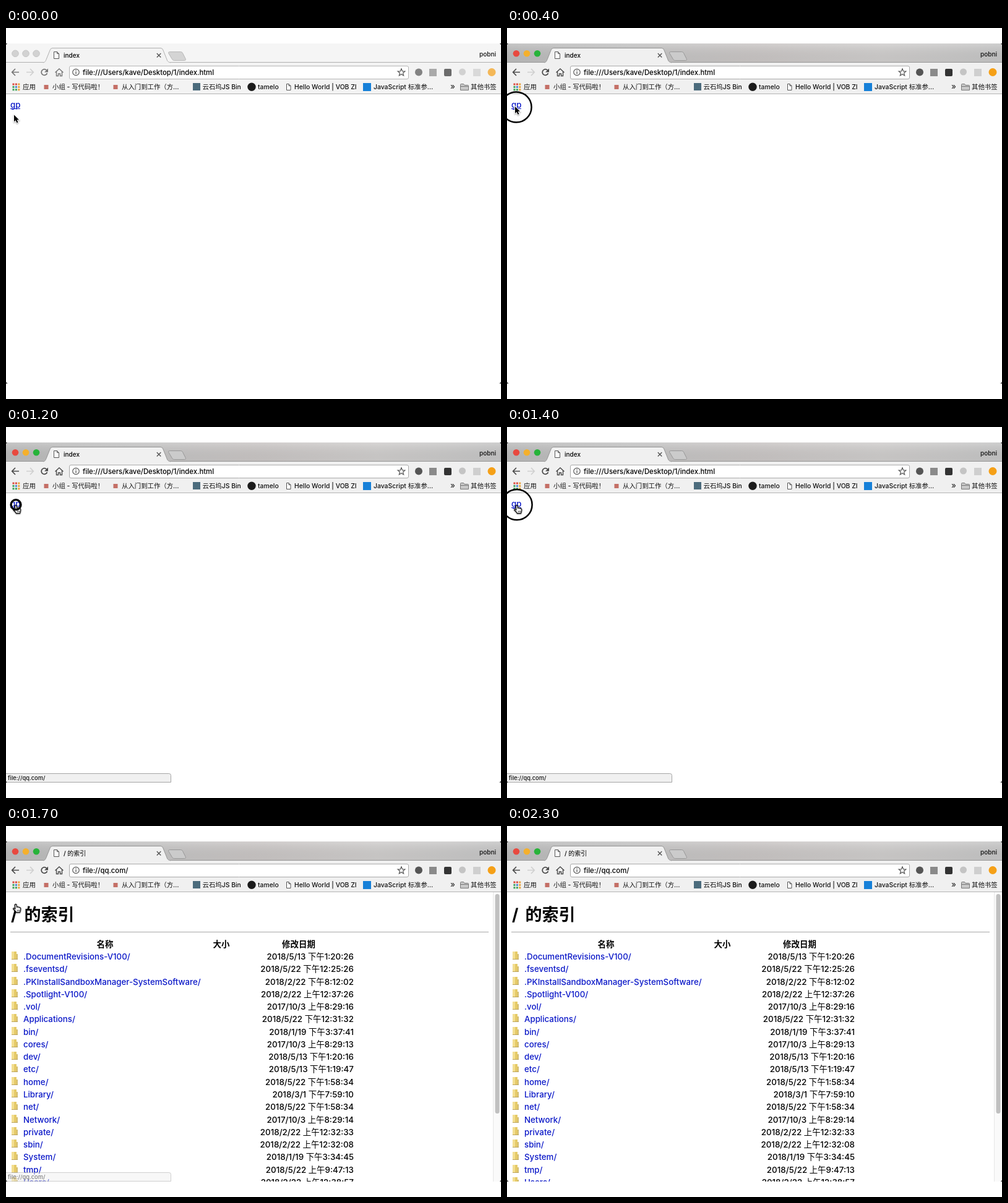
An HTML page with a canvas that plays this animation: 800 px wide and 600 px high, repeating every 2400 ms.

```html
<!DOCTYPE html>
<html lang="zh-CN">
<head>
<meta charset="utf-8">
<title>Browser link demo</title>
<style>
  html, body { margin: 0; width: 100%; height: 100%; overflow: hidden; background: #fff; }
  canvas { display: block; }
</style>
</head>
<body>
<canvas id="stage" width="800" height="600"></canvas>
<script>
const ctx = document.getElementById('stage').getContext('2d');
const LOOP = 2400, STEP = 100;
const FACE = 'Inter, "Noto Sans CJK SC", "Noto Sans CJK", sans-serif';
const LINK = '#0b18c8';

const FILES = [
  ['.DocumentRevisions-V100/', '2018/5/13 下午1:20:26'],
  ['.fseventsd/', '2018/5/22 下午12:25:26'],
  ['.PKInstallSandboxManager-SystemSoftware/', '2018/2/22 下午8:12:02'],
  ['.Spotlight-V100/', '2018/2/22 上午12:37:26'],
  ['.vol/', '2017/10/3 上午8:29:16'],
  ['Applications/', '2018/5/22 下午12:31:32'],
  ['bin/', '2018/1/19 下午3:37:41'],
  ['cores/', '2017/10/3 上午8:29:13'],
  ['dev/', '2018/5/13 下午1:20:16'],
  ['etc/', '2018/5/13 下午1:19:47'],
  ['home/', '2018/5/22 下午1:58:34'],
  ['Library/', '2018/3/1 下午7:59:10'],
  ['net/', '2018/5/22 下午1:58:34'],
  ['Network/', '2017/10/3 上午8:29:14'],
  ['private/', '2018/2/22 上午12:32:33'],
  ['sbin/', '2018/2/22 上午12:32:08'],
  ['System/', '2018/1/19 下午3:34:45'],
  ['tmp/', '2018/5/22 上午9:47:13'],
  ['Users/', '2018/2/22 上午12:38:57']
];

function text(str, x, y, size, color = '#000', align = 'left', weight = 500) {
  ctx.font = `${weight} ${size}px ${FACE}`;
  ctx.textAlign = align;
  ctx.fillStyle = color;
  ctx.fillText(str, x, y);
}

function rect(x, y, w, h, color) {
  ctx.fillStyle = color;
  ctx.fillRect(x, y, w, h);
}

function paint(fill, stroke, width = 1) {
  if (fill) { ctx.fillStyle = fill; ctx.fill(); }
  if (stroke) { ctx.strokeStyle = stroke; ctx.lineWidth = width; ctx.stroke(); }
}

function box(x, y, w, h, r, fill, stroke) {
  ctx.beginPath();
  ctx.roundRect(x, y, w, h, r);
  paint(fill, stroke);
}

function circle(x, y, r, fill, stroke, width) {
  ctx.beginPath();
  ctx.arc(x, y, r, 0, Math.PI * 2);
  paint(fill, stroke, width);
}

function shape(d, x, y, fill, stroke, width) {
  ctx.save();
  ctx.translate(x, y);
  const path = new Path2D(d);
  if (fill) { ctx.fillStyle = fill; ctx.fill(path); }
  if (stroke) {
    ctx.strokeStyle = stroke;
    ctx.lineWidth = width || 1;
    ctx.stroke(path);
  }
  ctx.restore();
}

function gradient(x, y, colors) {
  const g = ctx.createLinearGradient(0, 25, x, y);
  colors.forEach((c, i) => g.addColorStop(i / (colors.length - 1), c));
  return g;
}

function page(x, y, w, h) {
  shape(`M0 0H${w - 3}L${w} 3V${h}H0ZM${w - 3} 0V3H${w}`, x, y, '#fff', '#555');
}

function titleBar(active, title) {
  if (active) {
    rect(0, 25, 800, 31, gradient(800, 25, ['#bcbcbc', '#c4c4c4', '#cac6c5', '#d0cecd', '#c6c6c6']));
    rect(0, 25, 800, 31, gradient(0, 56, ['rgba(255,255,255,.16)', 'rgba(0,0,0,.04)']));
  } else {
    rect(0, 25, 800, 31, '#f5f5f5');
  }
  const line = active ? '#959595' : '#b0b0b0';
  const bar = active ? '#f0f0f0' : '#f3f3f3';
  rect(0, 55, 800, 1, line);
  rect(0, 56, 800, 50, bar);
  rect(0, 106, 800, 1, '#b3b3b3');

  const lights = active ? ['#e8493f', '#f5b02c', '#27b33a'] : ['#d2d2d2', '#d2d2d2', '#d2d2d2'];
  lights.forEach((c, i) => circle(15 + 17 * i, 41.3, 5.3, c, active ? null : '#c6c6c6'));

  shape('M60 56C64 55 64 53 65 51L71 36Q72 32.5 75 32.5H250Q253 32.5 254 36L260 51C261 54 262 55 266 56', 0, 0, bar, line);
  rect(61, 56, 204, 1, bar);
  shape('M2 0H20Q22 0 23 2L28 12Q28 14 26 14H9Q7 14 6 12L0 2Q0 0 2 0Z', 262.5, 38.5, active ? '#cbcbcb' : '#d4d4d4', active ? '#999' : '#b8b8b8');
  page(77.5, 38.5, 8, 11);
  text(title, 93, 48, 10);
  shape('M0 0L6.5 6.5M6.5 0L0 6.5', 243.8, 41, null, '#555', 1.4);
  text('pobni', 792, 45.5, 10, '#111', 'right');
}

function toolBar(active, url) {
  const ink = active ? '#4a4a4a' : '#777';
  shape('M12 5.5H1M6 0L.7 5.5L6 11', 9, 66, null, ink, 1.7);
  shape('M0 5.5H11M6 0L11.3 5.5L6 11', 33, 66, null, '#d0d0d0', 1.7);
  ctx.beginPath();
  ctx.arc(62, 71.5, 4.8, 0.35, Math.PI * 1.77);
  paint(null, ink, 1.7);
  shape('M6 0V6H0Z', 62, 65.5, ink);
  shape('M0 6.5L6.5 .5L13 6.5M2 5V12H5V8.5H8V12H11V5', 79.5, 65.5, null, ink, 1.4);

  box(102.5, 61.5, 548, 21, 2.5, '#fff', active ? '#a9a9a9' : '#b5b5b5');
  circle(113, 71.5, 5.2, null, '#555', 1.2);
  rect(112.4, 70.5, 1.3, 4, '#555');
  rect(112.4, 68, 1.3, 1.4, '#555');
  text(url, 124, 76, 11.3);

  ctx.beginPath();
  for (let i = 0; i < 10; i++) {
    const r = i % 2 ? 2.7 : 6.2, a = -Math.PI / 2 + i * Math.PI / 5;
    ctx.lineTo(639 + r * Math.cos(a), 72 + r * Math.sin(a));
  }
  ctx.closePath();
  paint(null, '#555', 1.2);

  ctx.globalAlpha = active ? 1 : 0.7;
  circle(667, 71.5, 6, '#555');
  rect(684, 66, 12, 12, '#8a8a8a');
  box(708, 66, 12, 12, 2, '#333');
  circle(737.5, 71, 5.5, '#c4c4c4');
  rect(755, 66, 12, 12, '#cfcfcf');
  circle(785, 71.5, 6.5, '#f5a017');
  ctx.globalAlpha = 1;
}

function bookmarks() {
  const dots = ['#dd4b3e', '#dd4b3e', '#e9a33b', '#3fa45b', '#4a86d8', '#e9a33b', '#3fa45b', '#3fa45b', '#e9a33b'];
  dots.forEach((c, i) => rect(10.5 + i % 3 * 4.4, 89.5 + Math.floor(i / 3) * 4.4, 3, 3, c));
  const mark = (str, x) => text(str, x, 98.7, 10.4, '#111');
  mark('应用', 27);
  rect(61.5, 92, 7, 7, '#c46f66');
  mark('小组 - 写代码啦！', 75);
  rect(173.5, 92, 7, 7, '#c46f66');
  mark('从入门到工作（方…', 187);
  rect(302, 89, 12, 12, '#4b6b7c');
  mark('云石坞JS Bin', 317.5);
  circle(397, 95.2, 6.7, '#1b1b1b');
  mark('tamelo', 407);
  page(453.5, 90.5, 6.5, 10);
  mark('Hello World | VOB ZI', 466);
  rect(577, 89, 13, 13, '#1680d8');
  mark('JavaScript 标准参…', 594);
  text('»', 718, 99, 13, '#333');
  shape('M0 10V1Q0 0 1 0H5L6.5 2H12Q13 2 13 3V10ZM0 4H13', 734.5, 90.5, '#c9c9c9', '#777');
  mark('其他书签', 751);
}

function folder(x, y) {
  rect(x + 1, y, 7, 12, '#f3df92');
  rect(x + 5, y, 4, 12, '#e5ca68');
  rect(x + 9, y + 4, 2, 8, '#d3bd74');
  rect(x + 1, y + 12, 10, 1, '#bba45c');
}

function listing() {
  text('/', 8, 153, 27, '#000', 'left', 700);
  text('的索引', 29.5, 153, 27, '#000', 'left', 700);
  rect(7, 171, 773, 1, '#a8a8a8');
  [['名称', 160], ['大小', 348], ['修改日期', 473]]
    .forEach(([s, x]) => text(s, x, 195.5, 13.5, '#000', 'center', 700));
  FILES.forEach(([name, date], i) => {
    const y = 216 + 20.27 * i;
    folder(8, Math.round(y - 13));
    text(name, 28, y, 13.3, LINK);
    text(date, 562, y, 13.4, '#000', 'right');
  });
  rect(787, 107, 13, 468, '#fafafa');
  rect(787, 107, 1, 468, '#e7e7e7');
  box(790.5, 110, 7, 355, 3.5, '#c0c0c0');
}

function status(alpha) {
  ctx.globalAlpha = alpha;
  box(-0.5, 560.5, 267, 14, [0, 3, 0, 0], '#f0f0f0', '#a5a5a5');
  text('file://qq.com/', 3, 571, 9.3, '#111');
  ctx.globalAlpha = 1;
}

function shadowed(draw) {
  ctx.save();
  ctx.shadowColor = 'rgba(0,0,0,.4)';
  ctx.shadowBlur = 2;
  ctx.shadowOffsetY = 1;
  draw();
  ctx.restore();
}

function arrow(y) {
  const d = 'M0 0V11L2.6 8.7L4.6 13L6.5 12.1L4.6 8H8Z';
  shadowed(() => shape(d, 13, y, null, '#fff', 1.8));
  shape(d, 13, y, '#000');
}

function hand() {
  const d = 'M3 1.4Q4.4-.6 5.8 1.2L6.4 5Q8 4 8.8 5.2Q10.2 4.6 10.8 5.9Q12.6 5.6 12.6 7.5Q12.8 10 11.4 13.6H5.2Q4.2 11.4 .5 8Q.2 6.4 1.8 6.8L3.6 8Z';
  shadowed(() => shape(d, 11.2, 126, '#fff', '#000', 1.1));
  shape('M7 9.5V12M8.8 9.5V12M10.5 9.5V12', 11.2, 126, null, '#000', 0.7);
}

// Ring that grows on each click; lasts three steps.
function ring(t, start, x, y) {
  const n = (t - start) / STEP;
  if (n >= 0 && n < 3) circle(x, y, 8 + 8.3 * n, null, '#000', 3.3 - 0.4 * n);
}

function draw(t) {
  const active = t >= 400, loaded = t >= 1500;
  rect(0, 0, 800, 600, '#fff');
  rect(0, 25, 800, 550, '#000');
  ctx.save();
  ctx.beginPath();
  ctx.roundRect(0, 25, 800, 550, 4);
  ctx.clip();
  rect(0, 25, 800, 550, '#fff');

  titleBar(active, t >= 1600 ? '/ 的索引' : 'index');
  toolBar(active, loaded ? 'file://qq.com/' : 'file:///Users/kave/Desktop/1/index.html');
  bookmarks();
  if (loaded) {
    listing();
  } else {
    text('gp', 7, 128.5, 13.3, LINK);
    rect(7, 130, 16, 1, LINK);
  }
  if (t >= 1100 && t < 1900) status(t < 1700 ? 1 : 0.5);

  if (t < 1100) arrow(t < 100 ? 140.5 : t < 200 ? 133 : 127);
  else if (t < 2300) hand();
  ring(t, 200, 15, 128);
  ring(t, 1200, 16, 125.7);
  ctx.restore();
}

function tick() {
  draw(Math.floor(performance.now() % LOOP / STEP) * STEP);
  requestAnimationFrame(tick);
}
tick();
</script>
</body>
</html>
```
